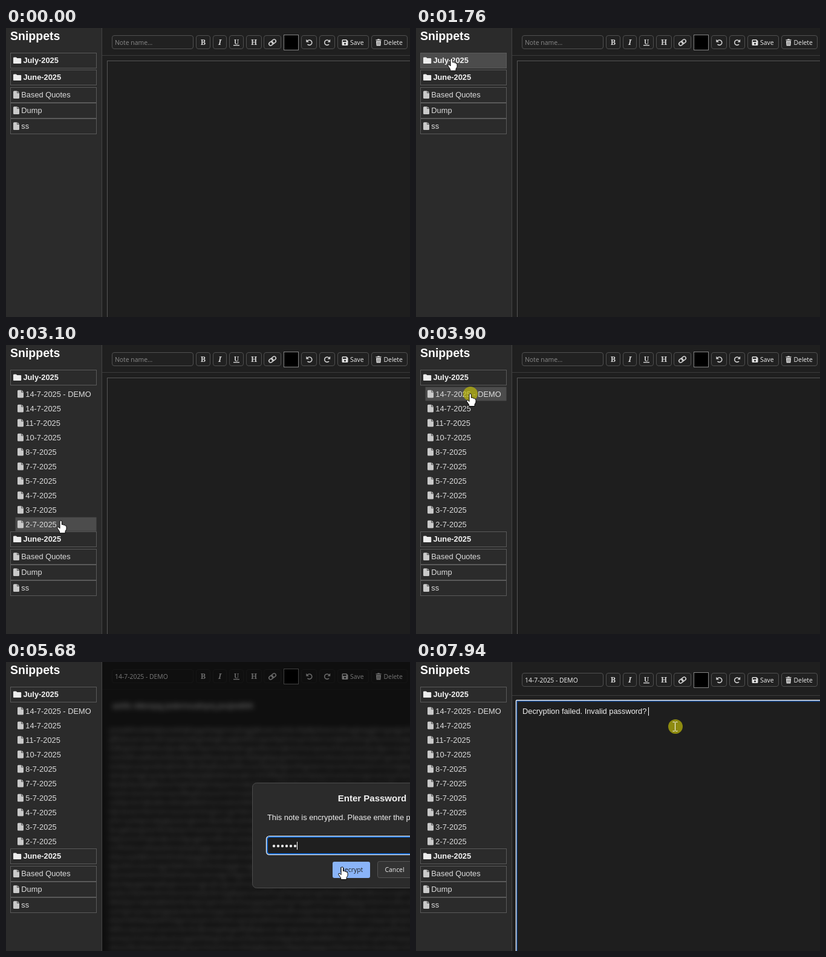
An HTML page for the animation above (8000 ms loop, 668 px wide and 479 px high).

```html
<!DOCTYPE html>
<html lang="en">
<head>
<meta charset="utf-8">
<title>Snippets</title>
<style>
  html, body { margin: 0; width: 100%; height: 100%; overflow: hidden; background: #1f1f1f; }
  svg { display: block; width: 668px; height: 479px; }
  text { font: 12.83px "Liberation Sans", Arial, sans-serif; fill: #ddd; white-space: pre; }
  .bold { font-weight: bold; fill: #f2f2f2; }
  .ui { font: 10.4px "Open Sans", "Noto Sans", sans-serif; fill: #ececec; }
  .slab { font: bold 12.5px "Noto Serif", serif; fill: #d2d2d2; text-anchor: middle; }
  .line { fill: none; stroke: #d2d2d2; stroke-width: 1.6; }
</style>
</head>
<body>
<svg id="stage" viewBox="0 0 668 479"></svg>
<script>
const LOOP = 8000;
const stage = document.getElementById('stage');

function el(parent, tag, attrs = {}, content) {
  const node = document.createElementNS('http://www.w3.org/2000/svg', tag);
  for (const key in attrs) node.setAttribute(key, attrs[key]);
  if (content !== undefined) node.textContent = content;
  parent.append(node);
  return node;
}
const group = (parent, attrs) => el(parent, 'g', attrs);
const rect = (parent, x, y, width, height, fill, more) =>
  el(parent, 'rect', { x, y, width, height, fill, ...more });
const path = (parent, d, attrs) => el(parent, 'path', { d, ...attrs });
const text = (parent, x, y, str, cls = '', more) =>
  el(parent, 'text', { x, y, class: cls, ...more }, str);
const show = (node, on) => { node.style.display = on ? '' : 'none'; };
const move = (node, x, y) => node.setAttribute('transform', `translate(${x} ${y})`);

// Times of the state changes
const T = {
  enter: 450, expand: 1960, open: 4050, type: 4620, close: 6100, focus: 7780
};
const PRESSES = [[1820, 1960], [3770, 3960], [5880, 6090], [7780, 8000]];
const TRACK = [
  [450, 575, 455], [620, 524, 424], [740, 468, 380], [1050, 130, 112], [1250, 66, 58],
  [1450, 59, 50], [2200, 59, 51], [2510, 68, 130], [2860, 88, 445], [3100, 91, 292],
  [3370, 90, 105], [3570, 90, 81], [3980, 90, 81], [4200, 300, 200], [4430, 483, 303],
  [5210, 483, 303], [5600, 552, 338], [5760, 560, 342], [6640, 560, 342],
  [7000, 520, 250], [7400, 445, 130], [7650, 429, 107], [8000, 429, 107]
];

function cursorAt(t) {
  const i = Math.max(1, TRACK.findIndex(p => p[0] >= t));
  const [a, b] = [TRACK[i - 1], TRACK[i]];
  const k = Math.max(0, (t - a[0]) / (b[0] - a[0]));
  return [a[1] + (b[1] - a[1]) * k, a[2] + (b[2] - a[2]) * k];
}

// Editor
rect(stage, 0, 0, 668, 479, '#1f1f1f');
const editor = rect(stage, 167.5, 54.5, 520, 440, '#1e1e1e', { stroke: '#565656' });

let seed = 7;
const random = () => (seed = seed * 16807 % 2147483647) / 2147483647;
function gibberish(length) {
  let s = '';
  while (s.length < length) s += String.fromCharCode(97 + Math.floor(random() * 26));
  return s;
}
const cipher = group(stage, { style: 'filter:blur(4px)' });
text(cipher, 176, 77, [5, 9, 13, 11].map(gibberish).join(' '), '', { style: 'fill:#fff' });
for (let y = 117; y < 490; y += 15) text(cipher, 170, y, gibberish(90), '', { opacity: 0.6 });

const ring = group(stage);
rect(ring, 165.5, 63.5, 520, 440, '#1e1e1e', { stroke: '#fff', 'stroke-width': 1.4, rx: 1 });
rect(ring, 166.9, 64.9, 520, 440, 'none', { stroke: '#1b62c4', 'stroke-width': 1.2 });
const message = text(stage, 176, 86, 'Decryption failed. Invalid password?', '', { style: 'fill:#f0f0f0' });
const caret = rect(stage, 384, 75, 1, 14, '#fff');

// Toolbar
const divider = rect(stage, 159, 45, 509, 1, '#3c3c3c');
const toolbar = group(stage);
const frames = group(toolbar);
const box = (x, w) => rect(frames, x + 0.5, 12.5, w - 1, 22, '#212121', { rx: 3.5, stroke: '#505050' });
box(175, 135);
const noteName = text(toolbar, 180, 28, '', 'ui');
[[314, 24], [342, 23], [369, 24], [397, 26], [426, 29], [488, 26], [518, 26], [548, 52], [604, 60]]
  .forEach(([x, w]) => box(x, w));
text(toolbar, 326, 28, 'B', 'slab');
text(toolbar, 353.5, 28, 'I', 'slab', { style: 'font-style:italic' });
text(toolbar, 381, 27, 'U', 'slab', { style: 'font-size:11px' });
rect(toolbar, 376, 28, 10, 1.4, '#d2d2d2');
text(toolbar, 410, 28, 'H', 'slab');
const link = group(toolbar, { transform: 'translate(440.5 24) rotate(-38)', class: 'line' });
rect(link, -6.5, -2.8, 7.4, 5.6, 'none', { rx: 2.8 });
rect(link, -0.9, -2.8, 7.4, 5.6, 'none', { rx: 2.8 });
rect(toolbar, 459.5, 11.5, 24, 25, '#000', { stroke: '#858585' });
function turn(transform) {
  const g = group(toolbar, { transform });
  path(g, 'M-3.4 -2.2A4.2 4.2 0 1 1 -3 3', { class: 'line' });
  path(g, 'M-5.2 -5.2V-.6H-.6Z', { fill: '#d2d2d2' });
}
turn('translate(501.5 24)');
turn('translate(531 24) scale(-1 1)');
path(toolbar, 'M557 19H563L565.5 21.5V27.5Q565.5 29 564 29H557Q555.5 29 555.5 27.5V20.5Q555.5 19 557 19ZM557 20.5V23H562.5V20.5ZM560.5 24.6A1.5 1.5 0 1 0 560.5 27.6A1.5 1.5 0 1 0 560.5 24.6Z',
  { fill: '#e0e0e0', 'fill-rule': 'evenodd' });
text(toolbar, 569, 28, 'Save', 'ui');
path(toolbar, 'M611.5 19.2H614L614.6 18.3H617.4L618 19.2H620.5V20.6H611.5ZM612 21.4H620L619.4 29.5H612.6Z', { fill: '#e0e0e0' });
path(toolbar, 'M614.3 23V28M616 23V28M617.7 23V28', { stroke: '#333', 'stroke-width': 0.6 });
text(toolbar, 624.5, 28, 'Delete', 'ui');

// Password dialog
const modal = group(stage);
rect(modal, 159, 0, 509, 479, '#000', { opacity: 0.5 });
rect(modal, 407.5, 200.5, 395, 174, '#2b2b2b', { rx: 7, stroke: '#4c4c4c' });
text(modal, 605.5, 231, 'Enter Password', 'bold', { 'text-anchor': 'middle', style: 'font-size:15px' });
text(modal, 432, 262, 'This note is encrypted. Please enter the password to decrypt it.', '', { style: 'fill:#f0f0f0' });
rect(modal, 430.5, 288.5, 350, 31, '#1f1f1f', { rx: 5, stroke: '#fff', 'stroke-width': 1.2 });
rect(modal, 432, 290, 347, 28, 'none', { rx: 4, stroke: '#1b6fd6', 'stroke-width': 1.8 });
const hint = text(modal, 440, 309, 'Password...', 'ui', { style: 'fill:#959595' });
const dots = group(modal);
for (let i = 0; i < 6; i++) el(dots, 'circle', { cx: 443 + i * 7, cy: 305, r: 2.2, fill: '#e4e4e4' });
const fieldCaret = rect(modal, 439, 298, 1, 13, '#fff');
rect(modal, 540, 331, 62, 27, '#8ab4f8', { rx: 3 });
text(modal, 571.3, 348, 'Decrypt', 'ui', { 'text-anchor': 'middle', style: 'fill:#1d1d1d' });
rect(modal, 614.5, 330.5, 57, 27, '#333', { rx: 3, stroke: '#555' });
text(modal, 642.5, 348, 'Cancel', 'ui', { 'text-anchor': 'middle' });

// Sidebar
rect(stage, 0, 0, 158, 479, '#2b2b2b');
rect(stage, 158, 0, 1, 479, '#444');
text(stage, 7, 20, 'Snippets', 'bold', { style: 'font-size:19.5px;fill:#fff' });

const rows = [];
function addRow(parent, label, kind, y, below) {
  const nested = kind === 'nested';
  const [x, h] = nested ? [15, 24] : [7, 26];
  const bg = rect(parent, x + 0.5, y + 0.5, 150 - x - 1, h - 1, 'transparent',
    { stroke: nested ? 'none' : '#5a5a5a' });
  const mid = y + h / 2 - (nested ? 0 : 0.5);
  const g = group(parent);
  move(g, nested ? 19 : 12, mid);
  if (kind === 'folder') {
    path(g, 'M1.2 -5H4.8L6.4 -3.4H12Q13.2 -3.4 13.2 -2.2V4.4Q13.2 5.6 12 5.6H1.2Q0 5.6 0 4.4V-3.8Q0 -5 1.2 -5Z', { fill: '#ececec' });
  } else {
    path(g, 'M1.5 -6.3H6.2V-2.6H10V5.2Q10 6.6 8.5 6.6H1.5Q0 6.6 0 5.2V-4.8Q0 -6.3 1.5 -6.3Z', { fill: '#c9c9c9' });
    path(g, 'M6.9 -6.3L10 -3.3H6.9Z', { fill: '#bdbdbd' });
  }
  text(parent, kind === 'folder' ? 28.4 : nested ? 32.3 : 25.3, Math.round(mid + 4.5), label, kind === 'folder' ? 'bold' : '');
  rows.push({ bg, x, y, h, nested, below });
}
const notes = group(stage);
const lower = group(stage);
addRow(stage, 'July-2025', 'folder', 41);
['14-7-2025 - DEMO', ...[14, 11, 10, 8, 7, 5, 4, 3, 2].map(d => d + '-7-2025')]
  .forEach((label, i) => addRow(notes, label, 'nested', 69 + 24 * i));
addRow(lower, 'June-2025', 'folder', 69, true);
['Based Quotes', 'Dump', 'ss'].forEach((label, i) => addRow(lower, label, 'file', 98 + 26 * i, true));

// Pointer
const pointer = group(stage);
const halo = el(pointer, 'circle', { r: 12, fill: '#beb90a', opacity: 0.7 });
const ink = { fill: '#fff', stroke: '#000', 'stroke-width': 1, 'stroke-linejoin': 'round' };
const shapes = {
  arrow: path(pointer, 'M0 0V16.5L3.8 13L6.4 19L9 17.9L6.4 12H11.5Z', ink),
  hand: path(pointer, 'M-2 1.5Q-2 -.3 -.3 -.3T1.4 1.5V6.4Q3.6 5.6 4.4 7.2Q6.4 6.6 7 8.2Q9 8 9 10.2V14L7 17.5V20.5H-2.4V18L-6 12.6Q-6.8 10.4 -5 10.2Q-3.6 10.4 -2 12.6Z', ink),
  beam: path(pointer, 'M-4.5 -7.5H-1.5L-.5 -6.5L.5 -7.5H3.5M-.5 -6.5V6.5M-4.5 7.5H-1.5L-.5 6.5L.5 7.5H3.5',
    { fill: 'none', stroke: '#fff', 'stroke-width': 1 })
};

function draw(t) {
  const [x, y] = cursorAt(t);
  const expanded = t >= T.expand;
  const loaded = t >= T.open;
  const asking = loaded && t < T.close;
  const failed = t >= T.close;
  const focused = t >= T.focus;
  const visible = t >= T.enter;

  show(notes, expanded);
  move(lower, 0, expanded ? 240 : 0);
  let overRow = false;
  for (const r of rows) {
    const top = r.y + (r.below && expanded ? 240 : 0);
    const hit = visible && (!r.nested || expanded) &&
      x >= r.x && x < 150 && y >= top && y < top + r.h;
    r.bg.setAttribute('fill', hit ? '#4c4c4c' : 'transparent');
    overRow = overRow || hit;
  }

  move(toolbar, 0, failed ? 6 : 0);
  move(divider, 0, failed ? 10 : 0);
  frames.style.opacity = divider.style.opacity = asking ? 0.25 : 1;
  noteName.textContent = loaded ? '14-7-2025 - DEMO' : 'Note name...';
  noteName.style.fill = loaded ? '#f4f4f4' : '#8a8a8a';

  show(editor, !loaded);
  show(cipher, asking);
  show(message, failed);
  show(ring, focused);
  show(caret, focused);
  const blur = focused ? Math.max(0, 4 - (t - T.focus) / 25) : 4;
  message.style.filter = blur ? `blur(${blur}px)` : 'none';

  show(modal, asking);
  const typed = t < T.type ? 0 : t < 5020 ? Math.min(5, 1 + Math.floor((t - T.type) / 65)) : 6;
  show(hint, !typed);
  [...dots.children].forEach((dot, i) => show(dot, i < typed));
  fieldCaret.setAttribute('x', 439 + typed * 7);

  show(pointer, visible);
  move(pointer, x, y);
  show(halo, PRESSES.some(([from, to]) => t >= from && t < to));
  const onButton = asking && x > 541 && x < 602 && y > 331 && y < 358;
  const inEditor = !asking && x > 167 && y > 54;
  const kind = overRow || onButton ? 'hand' : inEditor ? 'beam' : 'arrow';
  for (const name in shapes) show(shapes[name], name === kind);
}

const start = performance.now();
function tick() {
  draw((performance.now() - start) % LOOP);
  requestAnimationFrame(tick);
}
tick();
</script>
</body>
</html>
```
